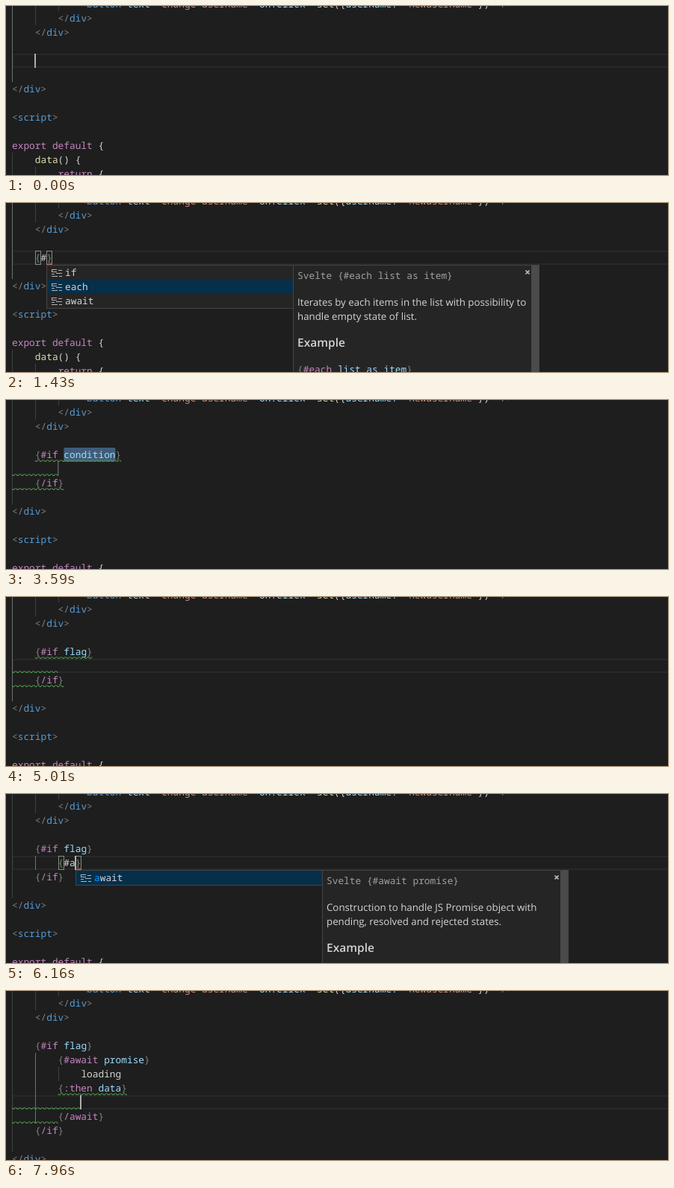
Animation, 886 px wide and 227 px high, one loop 8 s. Source, as an HTML page:

```html
<!DOCTYPE html>
<html lang="en">
<head>
<meta charset="utf-8">
<title>Editor snippets</title>
<style>
  html, body { margin: 0; width: 100%; height: 100%; overflow: hidden; background: #1e1e1e; }
  svg { display: block; width: 886px; height: 227px; }
  text {
    font: 12.83px "Noto Sans Mono", "DejaVu Sans Mono", monospace;
    white-space: pre;
    text-rendering: geometricPrecision;
    fill: #d4d4d4;
  }
  text.body { font: 13.28px "Open Sans", "Noto Sans", sans-serif; }
  text.head { font: 600 15.5px "Open Sans", "Noto Sans", sans-serif; }
  .g { fill: #808080; }
  .b { fill: #569cd6; }
  .p { fill: #c586c0; }
  .v { fill: #9cdcfe; }
  .s { fill: #ce9178; }
  .y { fill: #dcdcaa; }
  .w { fill: #d4d4d4; }
  .m { fill: #0097fb; }
  .t { fill: #a0a0a0; }
</style>
</head>
<body>
<svg viewBox="0 0 886 227">
  <defs>
    <pattern id="green" width="6" height="3" patternUnits="userSpaceOnUse">
      <path d="M5.5 0L2.5 3H1.1L4.1 0zM4 0L6 2V.6L5.4 0zM0 2L1 3H2.4L0 .6z" fill="#4d9e4d"/>
    </pattern>
    <pattern id="red" width="6" height="3" patternUnits="userSpaceOnUse">
      <path d="M5.5 0L2.5 3H1.1L4.1 0zM4 0L6 2V.6L5.4 0zM0 2L1 3H2.4L0 .6z" fill="#ea4646"/>
    </pattern>
  </defs>
  <g id="scene"></g>
</svg>
<script>
const LOOP = 8000, CHAR = 7.697, LINE = 19, LEFT = 8;
const FIRST = 3; // row where the edited block starts
const px = col => LEFT + col * CHAR;
const py = row => 7 + row * LINE;

// In line markup, "~x" switches to colour class x.
const HEAD = [
  '            ~g<~bbutton ~vtext~w=~s"change username" ~von:click~w=~s"~yset~w({~vusername:~s \'newusername\'~w})~s" ~g/>',
  '        ~g</~bdiv~g>',
  '    ~g</~bdiv~g>',
  ''
];
const TAIL = [
  '~g</~bdiv~g>', '', '~g<~bscript~g>', '',
  '~pexport default ~w{', '    ~ydata~w() {', '        ~preturn ~w{'
];
const IF_END = '    ~g{~p/if~g}';
const ifLine = word => `    ~g{~p#if ~v${word}~g}`;
const ifBlock = (word, inner = '') => [ifLine(word), inner, IF_END, ''];
const awaitBlock = [
  ifLine('flag'),
  '        ~g{~p#await ~vpromise~g}',
  '            ~wloading',
  '        ~g{~p:then ~vdata~g}',
  '',
  '        ~g{~p/await~g}',
  IF_END, ''
];
const plain = lines => lines.map(s => s.replace(/~\w/g, ''));
const awaitPlain = [awaitBlock[0], ...plain(awaitBlock.slice(1, 6)), ...awaitBlock.slice(6)];

const DOCS = {
  if: {
    title: 'Svelte {#if condition}',
    body: ['Conditionally renders block of template.'],
    code: '~g{~p#if ~vcondition~g}'
  },
  each: {
    title: 'Svelte {#each list as item}',
    body: ['Iterates by each items in the list with possibility to', 'handle empty state of list.'],
    code: '~g{~p#each ~vlist as item~g}'
  },
  await: {
    title: 'Svelte {#await promise}',
    body: ['Construction to handle JS Promise object with', 'pending, resolved and rejected states.'],
    code: '~g{~p#await ~vpromise~g}'
  }
};
const ALL = ['if', 'each', 'await'];

const steps = [];
let last = { at: 0 };
const step = (at, change) => steps.push(last = { ...last, ...change, at });
const blink = (...times) => times.forEach(at => step(at, { on: !last.on }));

step(0, {
  mid: ['', ''], cur: [3, 4], on: true, line: 3, active: 0, inner: [],
  boxes: [], red: [], green: [], sel: null, marks: [], end: null, popup: null
});
blink(190, 650);
step(830, { mid: ['    {}', ''], cur: [3, 5] });
step(886, { mid: ['    ~g{}', ''], boxes: [[3, 4], [3, 5]] });
step(942, { mid: ['    ~g{~w#~g}', ''], cur: [3, 6], boxes: [[3, 4], [3, 6]] });
step(998, { red: [[3, 6, 7]] });
step(1054, { popup: { col: 6, row: 4, items: ALL, pick: 1 } });
step(1110, { popup: { ...last.popup, doc: 'each' } });
blink(1430);
step(1700, { popup: { ...last.popup, pick: 0, doc: 'if' } });
blink(1900);

step(2080, {
  mid: plain(ifBlock('condition')), cur: [3, 18], line: null, active: -1, popup: null,
  boxes: [[3, 4], [5, 8]], red: [[5, 8, 9]], sel: [3, 9, 18], marks: [[3, 9, 18]], end: [4, 8]
});
step(2150, { mid: ifBlock('condition'), boxes: [], red: [] });
const ifWaves = n => [[3, 4, 10 + n], [4, 0, 8], [5, 0, 9]];
step(2220, { green: ifWaves(9) });
blink(2600, 3060, 3590);

for (let n = 1; n <= 4; n++) {
  step(3900 + (n - 1) * 78, {
    mid: ifBlock('flag'.slice(0, n)), cur: [3, 9 + n], on: true, line: 3, active: 0,
    sel: null, marks: [[3, 9, 9 + n]], green: ifWaves(n)
  });
}
step(4210, { boxes: [[3, 4], [3, 13]] });
step(4490, { cur: [4, 8], line: 4, marks: [], end: null });
step(4570, { boxes: [] });
blink(5010);

step(5290, { mid: ifBlock('flag', '        {}'), cur: [4, 9], on: true, active: 4, inner: [[4, 4, 5]] });
step(5370, { mid: ifBlock('flag', '        ~g{}'), boxes: [[4, 8], [4, 9]], green: [] });
blink(5760);
step(5910, {
  mid: ifBlock('flag', '        ~g{~w#~g}'), cur: [4, 10], on: true,
  boxes: [[4, 8], [4, 10]], red: [[4, 10, 11]]
});
step(5990, { popup: { col: 10, row: 5, items: ALL, pick: 0, doc: 'if' } });
step(6160, {
  mid: ifBlock('flag', '        ~g{~w#a~g}'), cur: [4, 11],
  boxes: [[4, 8], [4, 11]], red: [[4, 11, 12]],
  popup: { col: 11, row: 5, items: ['~ma~wwait'], pick: 0, doc: 'await' }
});

step(6640, {
  mid: awaitPlain, cur: [4, 23], line: null, active: -1, popup: null,
  inner: [[4, 4, 9], [8, 5, 6]], boxes: [[4, 8], [8, 15]], red: [[8, 15, 16]],
  sel: [4, 16, 23], marks: [[4, 16, 23], [5, 12, 19], [6, 15, 19]], end: [7, 12]
});
step(6690, { mid: awaitBlock, boxes: [], red: [], green: [[6, 8, 20], [7, 0, 12], [8, 0, 8]] });
blink(7090);
step(7400, { sel: [5, 12, 19], cur: [5, 19], on: true });
step(7680, { sel: [6, 15, 19], cur: [6, 19] });
step(7960, { sel: null, marks: [], end: null, cur: [7, 12], line: 7, active: 4 });

const esc = s => s.replace(/&/g, '&amp;').replace(/</g, '&lt;');
const rect = (x, y, w, h, fill, more = '') =>
  `<rect x="${x}" y="${y}" width="${w}" height="${h}" fill="${fill}" ${more}/>`;
const frame = (x, y, w, h, fill, stroke) =>
  rect(x + .5, y + .5, w - 1, h - 1, fill, `stroke="${stroke}"`);

function text(x, y, markup, cls = '') {
  const [lead, ...runs] = markup.split('~');
  const spans = runs.map(r => `<tspan class="${r[0]}">${esc(r.slice(1))}</tspan>`).join('');
  return `<text x="${x}" y="${y}" class="${cls}">${esc(lead)}${spans}</text>`;
}

const guide = (col, from, to, bright) =>
  rect(Math.round(px(col)), py(from), 1, (to - from) * LINE, bright ? '#707070' : '#404040');
const wave = id => ([row, a, b]) =>
  `<g transform="translate(${px(a)} ${py(row) + 16})">${rect(0, 0, (b - a) * CHAR, 3, `url(#${id})`)}</g>`;
const span = fill => ([row, a, b]) =>
  rect(px(a), py(row), (b - a) * CHAR, LINE, fill, 'rx="2"');
const box = ([row, col]) =>
  frame(Math.round(px(col)), py(row), 8, LINE, 'rgba(0,100,0,.1)', '#888');

const icon = (x, y) =>
  [[0, 0, 7, 1], [0, 3, 7, 1], [0, 1, 1, 2], [9, 1, 5, 1], [0, 6, 4, 1], [6, 5, 8, 1], [0, 9, 8, 1], [10, 9, 4, 1]]
    .map(([dx, dy, w, h]) => rect(x + dx, y + dy, w, h, '#b5b5b5')).join('');

function details(x, y, doc) {
  const { title, body, code } = DOCS[doc];
  const tx = x + 6, below = y + 72 + body.length * LINE;
  return frame(x, y, 330, 300, '#252526', '#454545') +
    rect(x + 319, y + 1, 10, 290, '#4b4b4c') +
    `<path d="M${x + 311.5} ${y + 7.5}l5 5m0-5l-5 5" stroke="#c5c5c5" stroke-width="1.6"/>` +
    text(tx, y + 19, '~t' + title) +
    body.map((s, i) => text(tx, y + 55 + i * LINE, s, 'body')).join('') +
    text(tx, below, 'Example', 'head') +
    text(tx, below + 35, code);
}

function popup({ col, row, items, pick, doc }) {
  const x = Math.round(px(col)), y = py(row);
  const rows = items.map((name, i) => {
    const top = y + 1 + i * LINE;
    return (i === pick ? rect(x + 1, top, 329, LINE, '#062f4a') : '') +
      icon(x + 7, top + 5) + text(x + 25, top + 14, name);
  });
  return frame(x, y, 331, items.length * LINE + 2, '#252526', '#454545') +
    rows.join('') + (doc ? details(x + 330, y, doc) : '');
}

function draw(s) {
  const tail = FIRST + s.mid.length;
  const lines = [...HEAD, ...s.mid, ...TAIL];
  return [
    s.line !== null ? rect(LEFT + 1, py(s.line) + 1, 890, LINE - 2, 'none', 'stroke="#282828" stroke-width="2"') : '',
    s.sel ? span('#264f78')(s.sel) : '',
    ...s.marks.map(span('rgba(124,124,124,.3)')),
    guide(0, -1, tail, s.active === 0),
    guide(4, -1, 1),
    guide(8, -1, 0),
    ...s.inner.map(([col, a, b]) => guide(col, a, b, col === s.active)),
    guide(0, tail + 5, tail + 9),
    guide(4, tail + 6, tail + 9),
    ...s.boxes.map(box),
    ...lines.map((l, i) => l ? text(LEFT, py(i - 1) + 14, l) : ''),
    ...s.green.map(wave('green')),
    ...s.red.map(wave('red')),
    s.end ? rect(Math.floor(px(s.end[1])), py(s.end[0]), 1.5, LINE, '#606060') : '',
    s.on ? rect(Math.round(px(s.cur[1]) - .9), py(s.cur[0]), 2, LINE, '#aeafad') : '',
    s.popup ? popup(s.popup) : ''
  ].join('');
}

const scene = document.getElementById('scene');
let shown = null;
function tick() {
  const t = performance.now() % LOOP;
  const now = steps.findLast(s => s.at <= t);
  if (now !== shown) scene.innerHTML = draw(shown = now);
  requestAnimationFrame(tick);
}
tick();
</script>
</body>
</html>
```
